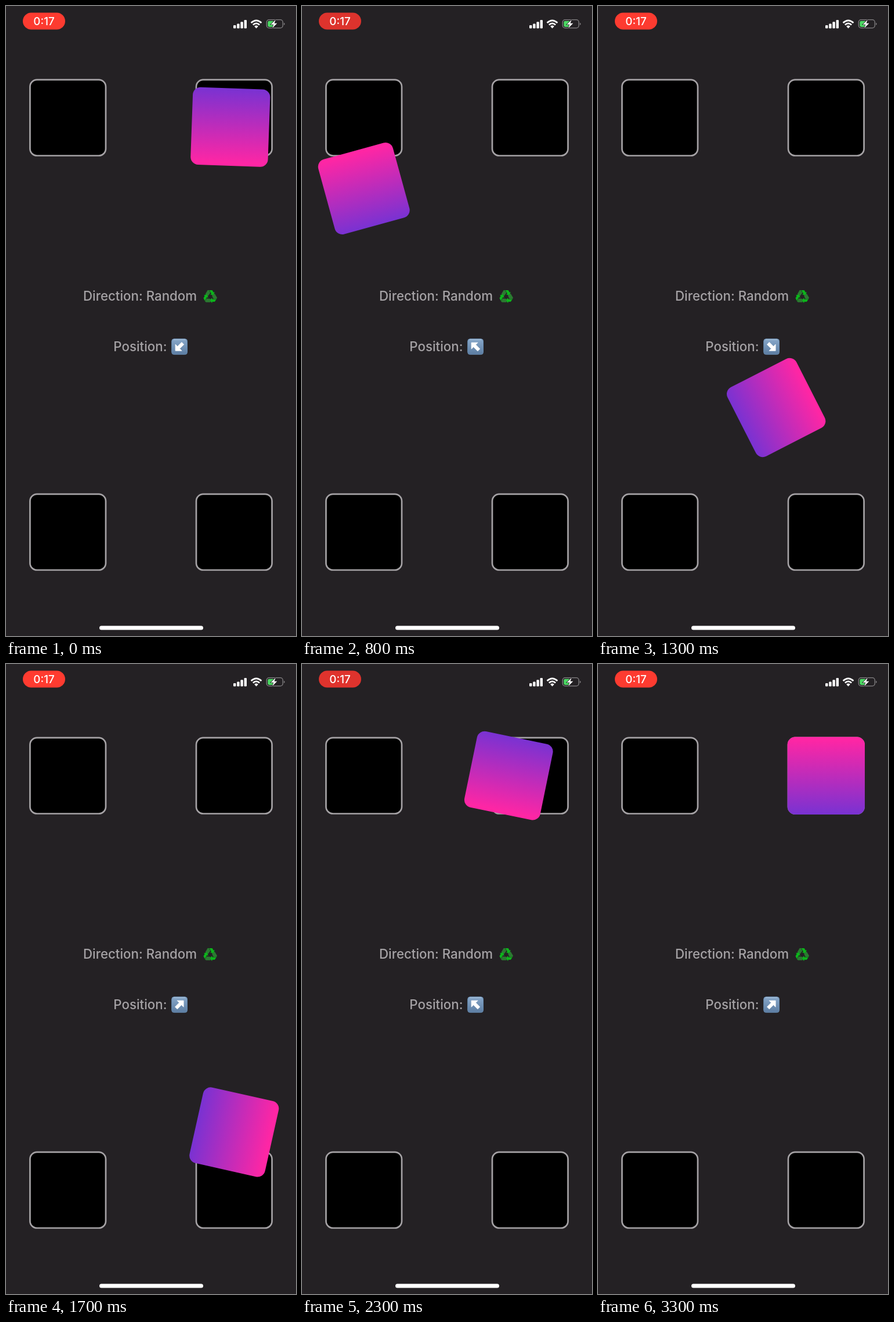
Write an HTML page that moves like this. It is 500 px wide and 1084 px high and loops after 3400 ms.

```html
<!DOCTYPE html>
<html lang="en">
<head>
<meta charset="utf-8">
<title>Random corners</title>
<style>
  html, body { margin: 0; width: 100%; height: 100%; overflow: hidden; background: #242124; }
  svg { display: block; width: 100%; height: 100%; }
  text { font-family: Inter, "Open Sans", sans-serif; font-weight: 500; }
  .label { font-size: 22.3px; fill: #a5a2a5; }
  .clock { font-size: 18.8px; fill: #fff; }
  .slot { fill: #000; stroke: #a5a2a5; stroke-width: 2.7; }
</style>
</head>
<body>
<svg viewBox="0 0 500 1084">
  <defs>
    <linearGradient id="cardFill" x2="0" y2="1">
      <stop offset=".03" stop-color="#ff26a4"/>
      <stop offset="1" stop-color="#7932d2"/>
    </linearGradient>
    <linearGradient id="keyFill" x2="0" y2="1">
      <stop stop-color="#88a8ca"/>
      <stop offset="1" stop-color="#5c7da2"/>
    </linearGradient>
    <g id="recycleArm">
      <path fill="#2b7a31" d="M-9-4.5-5-11.5Q-4-12.5-2.5-12L.5-7.5-3.5-1.5Z"/>
      <path fill="#0cb51b" d="M-3.5-12H3Q4-12 4.5-11L6-8 8.2-8.6 6.3-2.6 0-4 2.2-5.6-1-11Z"/>
    </g>
  </defs>

  <rect width="500" height="1084" fill="#242124"/>

  <rect id="pill" x="29" y="11.5" width="73" height="29" rx="14.5"/>
  <text class="clock" x="65.5" y="32.6" text-anchor="middle">0:17</text>

  <g fill="#fff">
    <rect x="392" y="33" width="4.4" height="5.5" rx="1.2"/>
    <rect x="398.2" y="30.5" width="4.4" height="8" rx="1.2"/>
    <rect x="404.4" y="27.3" width="4.4" height="11.2" rx="1.2"/>
    <rect x="410.6" y="24" width="4.4" height="14.5" rx="1.2"/>
    <path d="M431.5 38.5 428.2 35Q431.5 32.2 434.8 35Z"/>
  </g>
  <g fill="none" stroke="#fff" stroke-width="2.8">
    <path d="M422.6 29Q431.5 20.7 440.4 29"/>
    <path d="M425.9 32.5Q431.5 27.2 437.1 32.5"/>
  </g>

  <rect x="449.3" y="23.7" width="28" height="14.2" rx="4.3" fill="none" stroke="#858385" stroke-width="1.3"/>
  <path d="M479 28.5Q482.4 30.8 479 33.2Z" fill="#858385"/>
  <rect x="451.3" y="25.7" width="11.5" height="10.2" rx="2.4" fill="#4cd964"/>
  <path d="M464.8 23.8 456.6 31.8H461.4L459.2 38 467.4 29.8H462.6Z" fill="#fff" stroke="#242124" stroke-width="1.5" paint-order="stroke"/>

  <g id="slots"></g>

  <text class="label" x="133" y="507.3">Direction: Random</text>
  <g transform="translate(352 500.2) scale(.94)">
    <use href="#recycleArm"/>
    <use href="#recycleArm" transform="rotate(120)"/>
    <use href="#recycleArm" transform="rotate(240)"/>
  </g>

  <text class="label" x="185.3" y="594.3">Position:</text>
  <g transform="translate(299.1 586.2)">
    <rect x="-13.4" y="-13.4" width="26.8" height="26.8" rx="4" fill="url(#keyFill)" stroke="#668aaf"/>
    <path d="M-10.5-12.2H10.5" stroke="#b4cbe2" stroke-width="1"/>
    <path id="arrow" d="M-4-7H7V4L3.4.4-3.8 7.6-7.6 3.8-.4-3.4Z" fill="#fff" stroke="#fff" stroke-width=".8" stroke-linejoin="round"/>
  </g>

  <rect id="card" x="-66.7" y="-66.7" width="133.4" height="133.4" rx="13.3" fill="url(#cardFill)"/>
  <rect x="161" y="1066.5" width="179" height="7" rx="3.5" fill="#fff"/>
</svg>

<script>
const LOOP = 3400, STEP = 100, MOVE = 300;
const corners = {
  TL: { x: 106.7, y: 192.2, arrow: 270 },
  TR: { x: 393.3, y: 192.2, arrow: 0 },
  BR: { x: 393.3, y: 905.2, arrow: 90 },
  BL: { x: 106.7, y: 905.2, arrow: 180 }
};
// Start time and destination; every move also adds a quarter turn.
const moves = [
  [-32, 'BL'], [586, 'TL'], [1114, 'BR'], [1622, 'TR'], [2225, 'TL'], [2825, 'TR']
];

const byId = id => document.getElementById(id);
const clamp = v => Math.min(1, Math.max(0, v));
const mix = (a, b, p) => a + (b - a) * p;

// cubic-bezier(.42, 0, .58, 1)
function easeInOut(u) {
  if (u <= 0 || u >= 1) return clamp(u);
  let lo = 0, hi = 1, s;
  for (let i = 0; i < 24; i++) {
    s = (lo + hi) / 2;
    const x = 1.26 * s * (1 - s) ** 2 + 1.74 * s * s * (1 - s) + s ** 3;
    if (x < u) lo = s; else hi = s;
  }
  return s * s * (3 - 2 * s);
}

byId('slots').innerHTML = Object.values(corners).map(({ x, y }) =>
  `<rect class="slot" x="${x - 65.3}" y="${y - 65.3}" width="130.6" height="130.6" rx="12"/>`
).join('');

function draw(t) {
  const index = moves.findLastIndex(([start]) => start <= t);
  const [start, name] = moves[index];
  const from = corners[index ? moves[index - 1][1] : 'TR'];
  const to = corners[name];
  const p = easeInOut((t - start) / MOVE);
  const angle = 180 + 90 * (index + p);
  byId('card').setAttribute('transform',
    `translate(${mix(from.x, to.x, p)} ${mix(from.y, to.y, p)}) rotate(${angle})`);
  byId('arrow').setAttribute('transform', `rotate(${to.arrow})`);

  const dim = clamp(0.5 + Math.cos((t - 650) / 1000 * Math.PI));
  byId('pill').setAttribute('fill',
    `rgb(${mix(255, 221, dim)} ${mix(59, 51, dim)} ${mix(48, 45, dim)})`);
}

const origin = performance.now();
function tick() {
  const t = (performance.now() - origin) % LOOP;
  draw(Math.floor(t / STEP) * STEP);
  requestAnimationFrame(tick);
}
tick();
</script>
</body>
</html>
```
